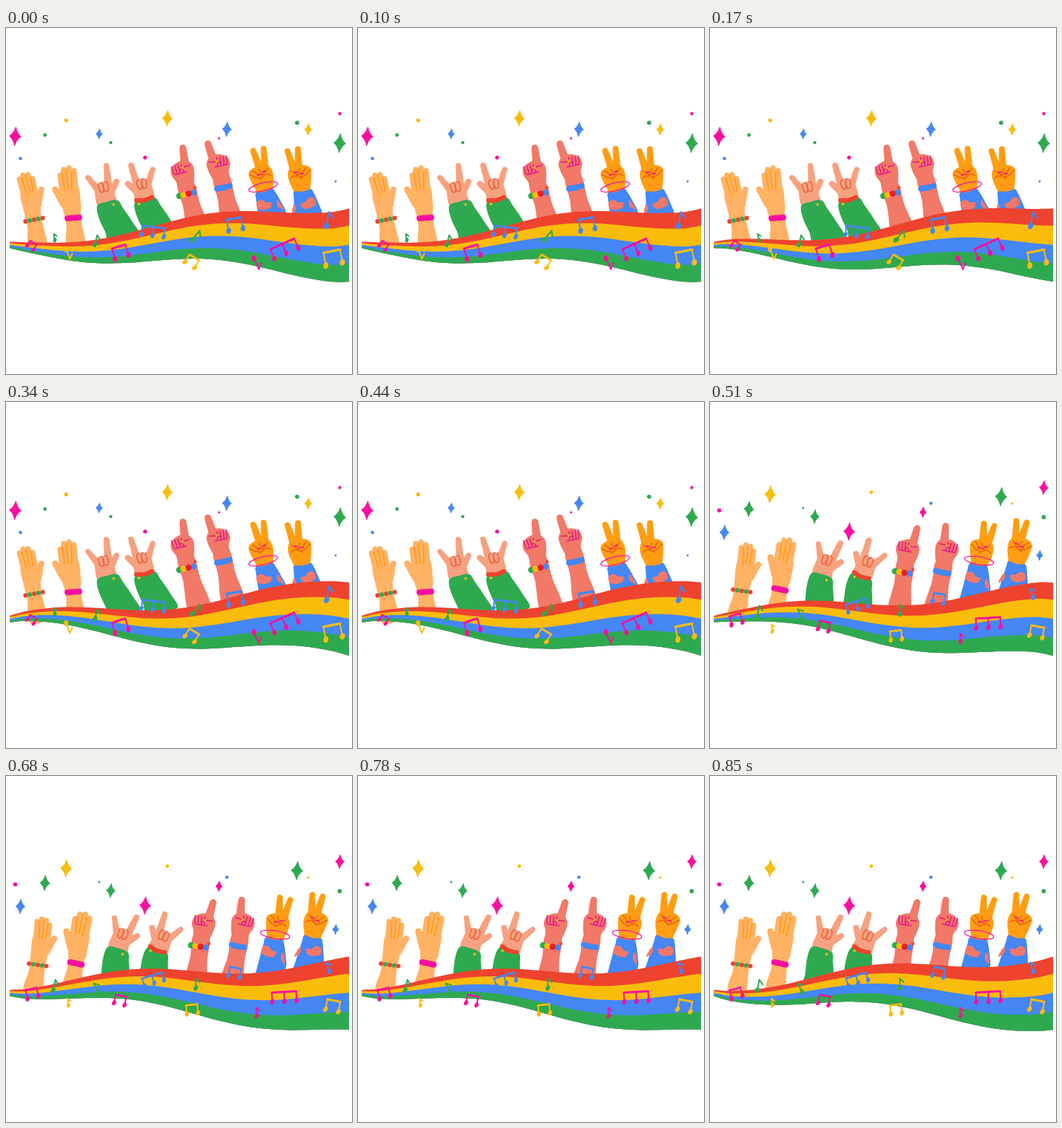
Recreate the animation shown at these times as an HTML page. Size 480 by 480 pixels, loop 1.02 s.

```html
<!DOCTYPE html>
<html lang="en">
<head>
<meta charset="utf-8">
<title>Raised hands over a rainbow ribbon</title>
<style>
  html, body { margin: 0; width: 100%; height: 100%; overflow: hidden; background: #fff; }
  svg { display: block; width: 100vw; height: 100vh; }
  .pose { animation: half 1020ms step-end infinite; }
  .pose.p1 { animation-delay: -510ms; }
  .wave { animation: sixth 1020ms step-end infinite; animation-delay: calc(var(--i) * 170ms - 1020ms); }
  @keyframes half { 0% { visibility: visible; } 50%, 100% { visibility: hidden; } }
  @keyframes sixth { 0% { visibility: visible; } 16.66666%, 100% { visibility: hidden; } }
</style>
</head>
<body>
<svg id="stage" viewBox="0 0 480 480" stroke-linecap="round" stroke-linejoin="round"></svg>
<script>
const RED = '#ee432e', YELLOW = '#fabc0b', BLUE = '#4487f5', GREEN = '#2fa950', PINK = '#fb0f9f';
const PEACH = '#ffb264', SALMON = '#f6a180', CORAL = '#f27868', ORANGE = '#ff9d12';
const CREASE = '#ff9f1c', FOLD = '#ee5a34', KNUCKLE = '#e9128c', DARK = '#ea5a10', RUBY = '#ef1d22';

// Drawing helpers
const points = s => s.match(/\S+ \S+/g).map(p => p.split(' ').map(Number));

// Smooth curve through points
function curve(p, closed) {
  const n = p.length;
  const at = i => closed ? p[(i + n) % n] : p[Math.max(0, Math.min(n - 1, i))];
  let d = '';
  for (let i = 0; i < (closed ? n : n - 1); i++) {
    const [a, b, c, e] = [at(i - 1), at(i), at(i + 1), at(i + 2)];
    d += `C${b[0] + (c[0] - a[0]) / 6} ${b[1] + (c[1] - a[1]) / 6} ` +
         `${c[0] - (e[0] - b[0]) / 6} ${c[1] - (e[1] - b[1]) / 6} ${c[0]} ${c[1]}`;
  }
  return d;
}
const blob = (fill, s) => { const p = points(s); return `<path fill="${fill}" d="M${p[0]}${curve(p, true)}Z"/>`; };
const line = (color, w, ...list) => list.map(s => {
  const p = points(s);
  return `<path fill="none" stroke="${color}" stroke-width="${w}" d="M${p[0]}${curve(p)}"/>`;
}).join('');
const dot = (fill, x, y, r) => `<circle fill="${fill}" cx="${x}" cy="${y}" r="${r}"/>`;
const group = (x, y, turn, body) => `<g transform="translate(${x} ${y}) rotate(${turn})">${body}</g>`;

// Tapered shape from a base of width w to a round tip
function finger(fill, x, y, tx, ty, w) {
  const a = Math.atan2(ty - y, tx - x), r = w * .36;
  const cx = tx - r * Math.cos(a), cy = ty - r * Math.sin(a);
  const side = (px, py, d) => `${px - d * Math.sin(a)} ${py + d * Math.cos(a)}`;
  return `<path fill="${fill}" d="M${side(x, y, w / 2)}L${side(cx, cy, r)}A${r} ${r} 0 0 0 ${side(cx, cy, -r)}L${side(x, y, -w / 2)}Z"/>`;
}

// Two poses alternate; each part is drawn once and placed in both
const back = ['', ''], front = ['', ''];

// A sparkle is a star in one pose and a dot in the other
function sparkle(fill, x, y, h, pose) {
  const w = h * .62, a = w * .3, b = h * .3;
  back[pose] += group(x, y, 4, `<path fill="${fill}" stroke="${fill}" d="M0 ${-h}Q${a} ${-b} ${w} 0Q${a} ${b} 0 ${h}Q${-a} ${b} ${-w} 0Q${-a} ${-b} 0 ${-h}Z"/>`);
  back[1 - pose] += dot(fill, x, y, h * .23);
}

// Hand with the wrist at the origin; flip is a scale, negative to mirror. Spots are [x, y, turn] per pose
function arm(hand, sleeve, extra, flip, ...spots) {
  const mirror = body => `<g transform="scale(${flip} ${Math.abs(flip)})">${body}</g>`;
  spots.forEach(([x, y, turn], i) => back[i] += group(x, y, turn, mirror(hand) + sleeve + mirror(extra)));
}

// n heads under a beam, or one head with a flag. Looks are [height, turn] per pose
function note(color, n, x, y, ...looks) {
  looks.forEach(([h, turn], i) => {
    const r = 1.8 + .12 * h, top = -h / 2, flag = Math.abs(turn) > 90 ? -.4 : .4;
    const xs = Array.from({ length: n }, (_, k) => (k - (n - 1) / 2) * 1.3 * h);
    const body = xs.map(px =>
      `<ellipse cx="${px}" cy="${h / 2}" rx="${r * .85}" ry="${r * 1.15}" fill="${color}" transform="rotate(20 ${px} ${h / 2})"/>` +
      line(color, 2, `${px} ${h / 2} ${px} ${top}`)).join('');
    const cap = n > 1 ? line(color, r * .85, `${xs[0]} ${top} ${xs[n - 1]} ${top}`)
                      : line(color, 2, `0 ${top} ${flag * h} ${top + .38 * h}`);
    front[i] += group(x, y, turn, body + cap);
  });
}

sparkle(PINK, 12.8, 150.3, 12.7, 0);
sparkle(BLUE, 129.3, 147, 6.7, 0);
sparkle(YELLOW, 223.8, 125.3, 10.8, 0);
sparkle(BLUE, 306.5, 140.5, 10, 0);
sparkle(YELLOW, 419.3, 140.8, 7.7, 0);
sparkle(GREEN, 463, 159.7, 13, 0);
sparkle(YELLOW, 83.5, 128.3, 11.8, 1);
sparkle(GREEN, 54, 148.5, 10.5, 1);
sparkle(GREEN, 145.4, 159, 9.5, 1);
sparkle(BLUE, 20, 181, 10, 1);
sparkle(PINK, 193, 179.7, 12, 1);
sparkle(PINK, 463, 118.8, 9.5, 1);
sparkle(GREEN, 403.8, 131.3, 12.7, 1);
sparkle(PINK, 295.5, 153, 7, 1);
sparkle(BLUE, 457.3, 212.8, 6.7, 1);

// Open palms
const palm =
  finger(PEACH, -6, -28, -9.5, -63, 10) + finger(PEACH, -1, -28, -3.5, -67.5, 10) +
  finger(PEACH, 4, -28, 3.5, -66.5, 10) + finger(PEACH, 8, -28, 9, -60, 10) + finger(PEACH, 8, -18, 19.5, -43, 11) +
  blob(PEACH, '-12 -38 -12 -20 -9 -6 9 -6 12 -18 12 -32 8 -40 -4 -42') +
  line(CREASE, 1.8, '-6 -60 -3 -36', '0 -63 1.5 -38', '6.5 -59 6 -38');
const bareArm = blob(PEACH, '-10 -13 9 -13 10.5 10 10 38 -14 38 -11 8');
const beadString = line(GREEN, 1.5, '-12 0 12 0') +
  [-2, -1, 0, 1, 2].map(k => dot(k % 2 ? GREEN : RED, k * 6.1, 0, 3.1)).join('');
arm(palm, bareArm, beadString, 1, [39, 266, -11], [44, 262, 8]);
arm(palm, bareArm, line(PINK, 7.5, '-7.5 0 0 -.5 7.5 -1'), -1.09, [93.5, 264, -8], [97, 260.5, 8]);

// Horns
const horns =
  finger(SALMON, 6, -20, 9.5, -54, 11) + finger(SALMON, -8, -18, -21, -42, 10) + finger(SALMON, 6, -10, 21, -29, 11) +
  blob(SALMON, '-11 -27 -14 -16 -12 4 12 4 13 -10 11 -26 0 -29') +
  [-4, 2.5].map(x => line(FOLD, 1.4, `${x - 3} -27 ${x - 3} -18 ${x} -15 ${x + 3} -18 ${x + 3} -27 ${x} -29`)).join('');
const greenSleeve = blob(GREEN, '-14 2 0 -1 15 0 21 13 30 34 35 56 -5 56 -10 40 -15 19');
const button = dot(YELLOW, 8.5, 4.5, 1.8);
arm(horns, greenSleeve, button, 1, [140, 242, -11], [155.3, 240, 20]);
arm(horns, greenSleeve, line(RED, 6, '-11 -1 0 1 11 -1') + button, -1, [192, 238, -11], [210, 241.5, 22]);

// Pointing
const pointing =
  finger(CORAL, 5, -34, 9, -68, 13) +
  blob(CORAL, '-14 -40 -4 -46 8 -46 16 -37 15 -24 11 -10 10 -4 -10 -4 -12 -20 -16 -30') +
  [-13, -8.5, -4, .5].map(x => line(KNUCKLE, 1.5, `${x} -42 ${x + 1} -31 ${x + 5} -30`)).join('') +
  line(KNUCKLE, 1.5, '-4 -34 3 -37 12 -38') + dot(YELLOW, 1.5, -37, 1.8);
const coralArm = blob(CORAL, '-11 -14 11 -14 13 18 17 62 -13 62 -11 16');
const bigBeads = dot(RED, 11.5, -6, 2.2) +
  [GREEN, YELLOW, BLUE, RUBY].map((c, k) => dot(c, [-12.5, -6.5, 8, .8][k], 0, 4.3)).join('');
arm(pointing, coralArm, bigBeads, 1, [252.5, 230, -14], [269, 236.8, 9]);
arm(pointing, coralArm, line(BLUE, 8, '-9 0 0 .5 9 0'), -1, [301.5, 221, -12], [322, 236, 12]);

// Peace signs
const peace =
  finger(ORANGE, 2, -32, -1.8, -67, 11.5) + finger(ORANGE, 8, -32, 14, -66, 11) +
  blob(ORANGE, '-15 -34 -6 -40 10 -41 17 -32 17 -20 13 -7 12 2 -11 2 -11 -8 -14 -20') +
  line(DARK, 1.4, '-14 -32 -7 -26 0 -24', '-9 -36 -2 -29 5 -27', '0 -36 4 -28 12 -34', '-2 -22 8 -27 14 -24') +
  line(PINK, 1.8, '-4 -28 0 -29', '4 -31 8 -32');
const blueSleeve = `<path fill="${BLUE}" d="M-13 -4H13L16 4L22 26V58H-20L-17 34L-15 14Z"/>` + line(BLUE, 7, '-10 -2 0 0 10 -2');
const patches = blob(CORAL, '-14 8 -7 6 -1 11 6 13 2 20 -8 20 -15 16') + blob(CORAL, '14 12 17 16 20 27 13 20');
const hoop = `<ellipse cy="-11" rx="20.5" ry="5.5" fill="none" stroke="${PINK}" stroke-width="1.3"/>`;
arm(peace, blueSleeve, patches + hoop, 1, [359.5, 231, -14], [371.5, 231, 9]);
arm(peace, blueSleeve, patches, -1, [412.5, 230.5, -8], [425, 228.5, 12]);

note(PINK, 2, 36, 301.3, [8, 32], [12, -14]);
note(GREEN, 1, 67, 290, [8.6, -10], [14.8, 12]);
note(YELLOW, 1, 86, 313.6, [14.5, 158], [9, -6]);
note(GREEN, 1, 125, 294, [13.3, 13], [14, -27]);
note(PINK, 2, 158.4, 310.5, [15, -17], [11.5, 12]);
note(BLUE, 3, 204, 282, [12, 6], [11, -17]);
note(GREEN, 1, 263.4, 287.5, [16.7, 39], [13, 0]);
note(YELLOW, 2, 258, 323.4, [12, 31], [12, -6]);
note(BLUE, 2, 317.5, 272, [15.5, -10], [12, 11]);
note(PINK, 1, 347.4, 327, [16.5, 155], [11, -3]);
note(PINK, 3, 386, 306, [14, -24], [13, -3]);
note(BLUE, 1, 446.3, 265, [19.5, 9], [12.6, -18]);
note(YELLOW, 2, 453.5, 318.4, [18, -11], [14, 11]);

// Ribbon: a ripple runs along a widening band, pinned at both ends
const LEFT = 5.5, RIGHT = 476, STEPS = 24;
const BANDS = [[RED, 0], [YELLOW, .235], [BLUE, .495], [GREEN, .757]];
const mix = (a, b, t) => a + (b - a) * t;

function edge(depth, step) {
  return Array.from({ length: STEPS + 1 }, (_, k) => {
    const u = k / STEPS, x = mix(LEFT, RIGHT, u);
    const swell = 13 * Math.pow(Math.max(0, Math.sin(Math.PI * u)), .6);
    const ripple = Math.cos(Math.PI / 3 * (step - .5 - (x - 120) / 73));
    return [x, mix(mix(296.5, 250.5, u), mix(305.5, 352, u), depth) + swell * ripple];
  });
}
function wave(step) {
  const low = edge(1, step).reverse();
  const bands = BANDS.map(([fill, depth]) => {
    const high = edge(depth, step);
    return `<path fill="${fill}" d="M${high[0]}${curve(high)}L${low[0]}${curve(low)}Z"/>`;
  });
  return `<g class="wave" style="--i:${step}">${bands.join('')}</g>`;
}

const poses = parts => parts.map((body, i) => `<g class="pose p${i}">${body}</g>`).join('');
document.getElementById('stage').innerHTML =
  poses(back) + [0, 1, 2, 3, 4, 5].map(wave).join('') + poses(front);
</script>
</body>
</html>
```
